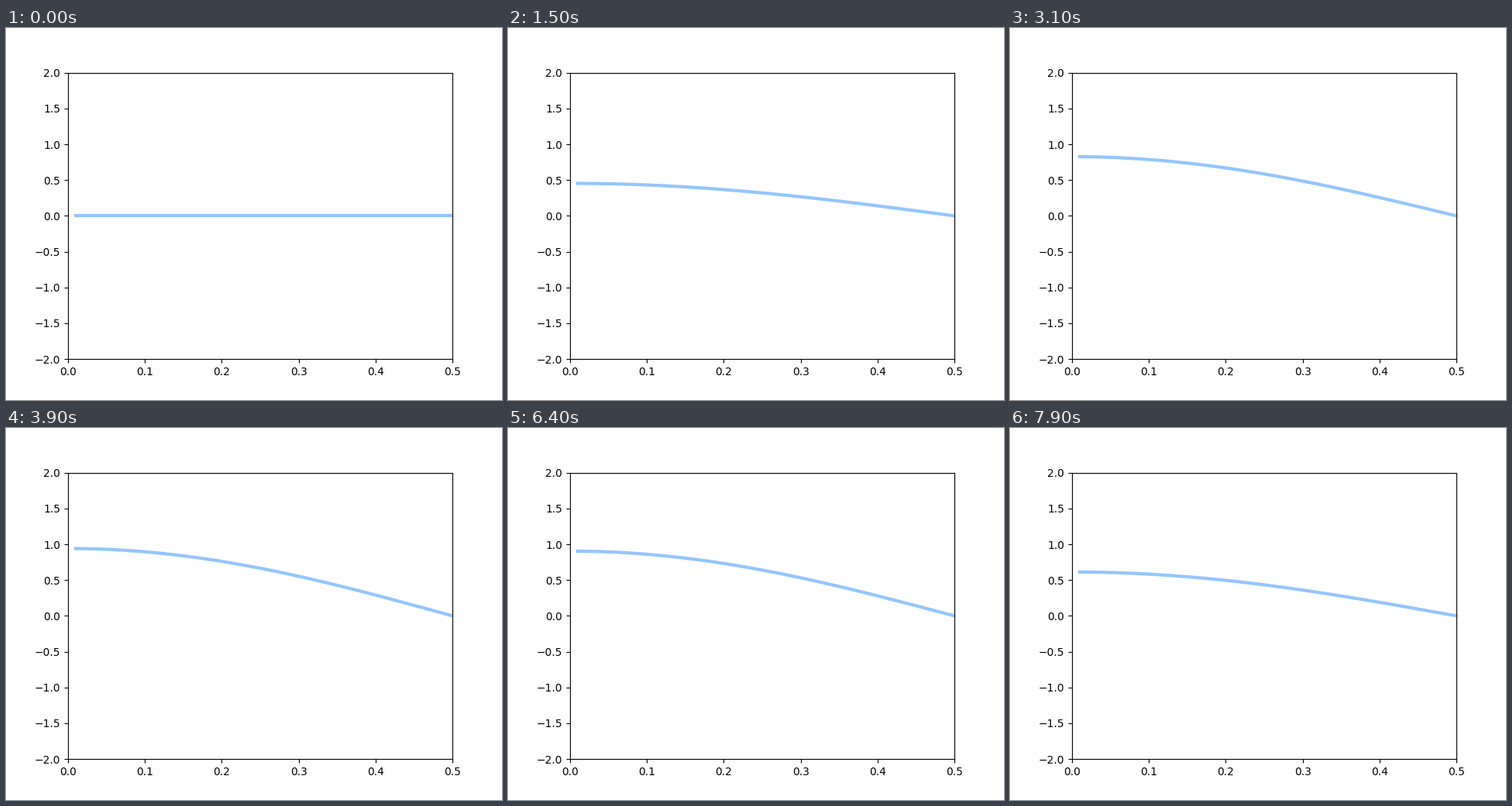
Recreate the animation shown at these times as a matplotlib script. Size 640 by 480 pixels, loop 8 s.

```python
import numpy as np
import matplotlib.pyplot as plt
from matplotlib.animation import FuncAnimation

FRAMES = 80
INTERVAL = 100  # ms
PERIOD = 20.0   # seconds per full oscillation

fig = plt.figure(figsize=(6.4, 4.8), dpi=100)
ax = plt.axes(xlim=(0, 0.5), ylim=(-2, 2))
line, = ax.plot([], [], lw=3, color="#92C6FF")

x = np.linspace(0.01, 0.5, 500)
mode = np.cos(np.pi * x)


def update(frame):
    """Standing wave: a fixed cosine shape with a sinusoidal amplitude."""
    t = frame * INTERVAL / 1000
    line.set_data(x, np.sin(2 * np.pi * t / PERIOD) * mode)
    return line,


anim = FuncAnimation(fig, update, frames=FRAMES, interval=INTERVAL,
                     repeat=True, repeat_delay=0)
plt.show()
```
